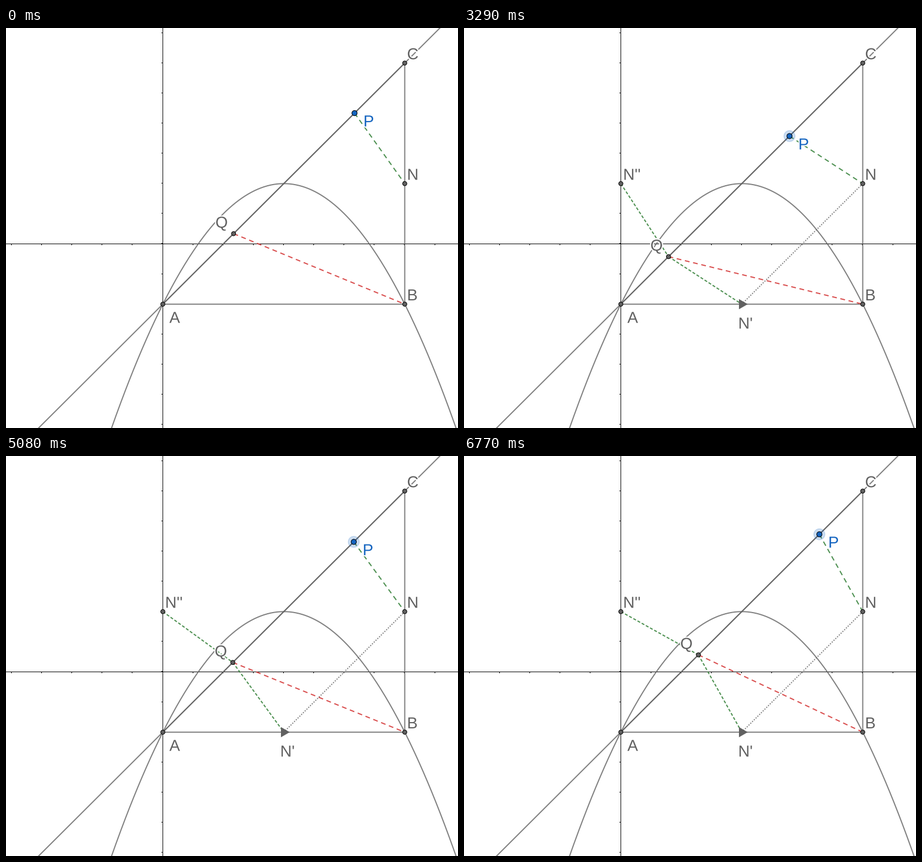
Write a matplotlib script that moves like this. It is 794 by 705 pixels and loops after 7.25 s.

```python
import numpy as np
import matplotlib.pyplot as plt
from matplotlib.animation import FuncAnimation
from matplotlib.patheffects import withStroke

W, H, DPI = 794, 705, 64
LOOP, STEP = 7250, 25
PX = 72 / DPI                      # one pixel in points
UNIT, OX, OY = 53.12, 275.5, 380.5
GREY, BLUE, GREEN, RED = "#616161", "#1565c0", "#2e7d32", "#d32f2f"
THICK = 2
LONG, SHORT, DOTS = (8.4, 6.4), (5.2, 3.2), (2, 2.4)   # dash and gap in pixels

# The drag advances in ticks; key poses are (tick, height of P)
SHOW_N1, DRAG_START, SHOW_N2, TICK = 1240, 2420, 2690, 120.8
REST_Y = 150
KEYS = [(0, 182.5), (2, 155.5), (7, 190.5), (8, 190.5), (12, 167.3), (15, 130.5),
        (18, 157), (24, 148.5), (26, 153.5), (27, 151), (31, 151), (36, 138)]


def drag_y(t):
    tick = np.floor((t - DRAG_START) / TICK)
    return np.interp(tick, *zip(*KEYS), left=REST_Y)


def pt(x, y):
    return np.array([OX + UNIT * x, OY - UNIT * y])


A, B, C, N = pt(0, -2), pt(8, -2), pt(8, 6), pt(8, 2)
N1, N2 = pt(4, -2), pt(0, 2)

fig = plt.figure(figsize=(W / DPI, H / DPI), dpi=DPI, facecolor="white")
ax = fig.add_axes([0, 0, 1, 1])
ax.set(xlim=(0, W), ylim=(H, 0))
ax.axis("off")


def segment(p, q, color=GREY, width=THICK, dash=None, alpha=0.8, z=2):
    style = (0, [d / width for d in dash]) if dash else "-"
    return ax.plot(*zip(p, q), color=color, lw=width * PX, ls=style, alpha=alpha,
                   zorder=z, solid_capstyle="butt", snap=False)[0]


def dot(p, radius=3.7, color=GREY, edge="black", alpha=1, z=5):
    return ax.add_patch(plt.Circle(p, radius, fc=color, ec=edge, lw=PX,
                                   alpha=alpha, zorder=z))


def label(text, p, dx=4, dy=-6.7, color=GREY):
    halo = withStroke(linewidth=4 * PX, foreground="white")
    return ax.text(p[0] + dx, p[1] + dy, text, color=color, fontsize=28 * PX,
                   family="Liberation Sans", va="baseline", ha="left",
                   path_effects=[halo], zorder=4)


def axis_line(p, q):
    segment(p, q, "black", 1, alpha=1, z=1)


# Axes with ticks on whole pixels
axis_line((0, OY), (W, OY))
axis_line((OX, 0), (OX, H))
for k in range(-6, 10):
    x, y = np.round(pt(k, k)) - 0.5
    axis_line((x, OY), (x, OY + 2.5))
    axis_line((OX - 2.5, y), (OX, y))

# Fixed figure
u = np.linspace(-3, 11, 400)
ax.plot(*pt(u, 2 - (u - 4) ** 2 / 4), color=GREY, lw=THICK * PX, alpha=0.8)
segment(pt(-6, -8), pt(12, 10))
for p, q in ((A, B), (B, C), (A, C)):
    segment(p, q)
for p in (A, B, C, N):
    dot(p)
for name, p in (("B", B), ("C", C), ("N", N)):
    label(name, p)
label("A", A, 11.5, 33)

# Mirror point, then the rotated one
link1 = segment(A, N1, GREEN, dash=SHORT, alpha=0.85)
link2 = segment(N2, A, GREEN, dash=SHORT, alpha=0.85)
marker = ax.add_patch(plt.Polygon(N1 + [(-5, -9), (-5, 9), (10.5, 0)],
                                  color=GREY, lw=0, zorder=5))
first = [link1, marker, segment(N, N1, dash=DOTS), label("N'", N1, -6.3, 43)]
second = [link2, dot(N2), label("N''", N2)]

# Moving parts
green = segment(A, N, GREEN, dash=LONG, alpha=0.85)
red = segment(A, B, RED, dash=LONG, alpha=0.85)
glow = dot(A, 9.8, BLUE, BLUE, 0.22, z=4.5)
dot_p, dot_q = dot(A, 4.6, BLUE, z=6), dot(A)
text_p, text_q = label("P", A, color=BLUE), label("Q", A)


def update(i):
    t = (i + 1) * STEP - 1
    y = drag_y(t)
    p = np.array([A.sum() - y, y])
    q = p + np.array([-4, 4]) * UNIT
    for line, start, end in ((green, p, N), (red, q, B), (link1, q, N1), (link2, N2, q)):
        line.set_data(*zip(start, end))
    for circle, center in ((glow, p), (dot_p, p), (dot_q, q)):
        circle.set_center(center)
    text_p.set_position(p + (15.6, 23.5))
    text_q.set_position(q + (-31.9, -10.5))
    for group, shown_from in (([glow], DRAG_START), (first, SHOW_N1), (second, SHOW_N2)):
        for art in group:
            art.set_visible(t >= shown_from)
    return []


anim = FuncAnimation(fig, update, frames=LOOP // STEP, interval=STEP,
                     repeat=True, repeat_delay=0)
plt.show()
```
